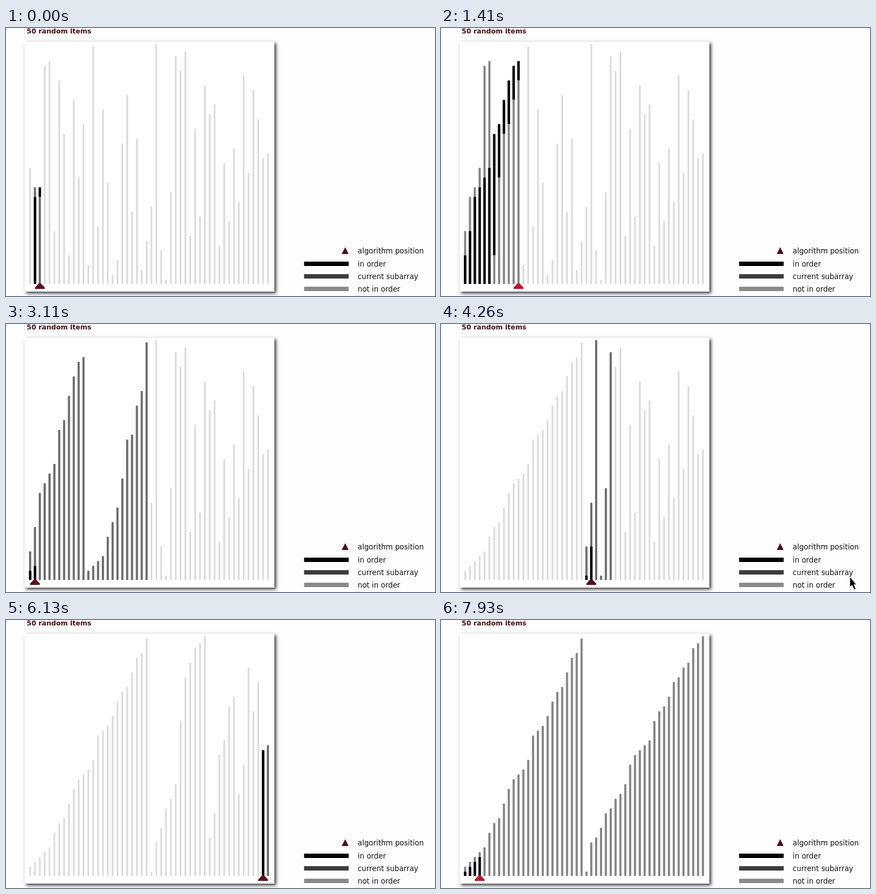
Recreate the animation shown at these times as an HTML page with a canvas. Size 788 by 491 pixels, loop 8000 ms.

```html
<!DOCTYPE html>
<html lang="en">
<head>
<meta charset="utf-8">
<title>Merge sort</title>
<style>
  html, body { margin: 0; width: 100%; height: 100%; overflow: hidden; background: #fefefe; }
  canvas { display: block; }
</style>
</head>
<body>
<canvas id="stage" width="788" height="491"></canvas>
<script>
const ctx = document.getElementById('stage').getContext('2d');

const LOOP = 8000, TICK = 77.67, LAST_TICK = 102;
const BASE = 469, CEILING = 29.5;
const LIGHT = '#dbdbdb', DARK = '#6d6d6d', GREY = '#868686', MAROON = '#5a0f1c', RED = '#bd1530';

const items = [
  24, 20, 18, 45, 46, 11, 42, 31, 6, 38, 22, 33, 4, 49, 12, 36, 21, 2, 5, 29, 39, 15, 30, 3, 9,
  16, 50, 7, 1, 19, 47, 44, 48, 10, 32, 14, 41, 35, 37, 8, 25, 13, 28, 17, 43, 23, 40, 34, 26, 27
];

// Record every merge with the array as it was before and the merged run.
const merges = [];
let total = 0;
function sort(a, lo, hi) {
  if (hi - lo < 2) return;
  const mid = lo + ((hi - lo) >> 1);
  sort(a, lo, mid);
  sort(a, mid, hi);
  const before = a.slice();
  const run = a.slice(lo, hi).sort((p, q) => p - q);
  a.splice(lo, hi - lo, ...run);
  merges.push({ lo, hi, before, run, start: total });
  total += hi - lo;
}
sort(items.slice(), 0, items.length);

const barX = i => 44.3 + 8.915 * i;
const barTop = v => Math.max(CEILING, 469.8 - 8.9 * v);

function bar(i, top, bottom, color, width) {
  ctx.fillStyle = color;
  ctx.beginPath();
  ctx.roundRect(barX(i) - width / 2, top, width, bottom - top, 1);
  ctx.fill();
}

function poly(points, fill, stroke, width = 1) {
  ctx.beginPath();
  points.forEach(([x, y]) => ctx.lineTo(x, y));
  ctx.closePath();
  ctx.fillStyle = fill;
  ctx.fill();
  if (!stroke) return;
  ctx.strokeStyle = stroke;
  ctx.lineWidth = width;
  ctx.stroke();
}

function text(str, x, y, font, color) {
  ctx.font = font;
  ctx.fillStyle = color;
  ctx.fillText(str, x, y);
}

function panel() {
  ctx.save();
  ctx.shadowColor = 'rgba(0,0,0,.8)';
  ctx.shadowBlur = 6;
  ctx.shadowOffsetX = ctx.shadowOffsetY = 2.5;
  ctx.fillStyle = '#fff';
  ctx.fillRect(34, 25, 459, 458);
  ctx.restore();
}

function legend() {
  const font = '13.35px "DejaVu Sans", sans-serif';
  poly([[623, 402.5], [628.5, 413.5], [617.5, 413.5]], MAROON, '#2a0a10');
  text('algorithm position', 646, 413, font, '#111');
  [['in order', '#000'], ['current subarray', '#3c3c3c'], ['not in order', '#8a8a8a']].forEach(([label, color], i) => {
    const y = 432 + 23 * i;
    ctx.fillStyle = color;
    ctx.fillRect(547.5, y - 4, 82, 8);
    text(label, 646, y + 4.5, font, '#111');
  });
}

function bars(count) {
  const m = merges.findLast(e => e.start < count);
  const done = count - m.start;
  const idle = done < 3 ? DARK : GREY;
  m.before.forEach((old, i) => {
    const top = barTop(old);
    if (i < m.lo || i >= m.hi) return bar(i, top, BASE, LIGHT, 3.2);
    if (i >= m.lo + done) return bar(i, top, BASE, idle, 4);
    const next = barTop(m.run[i - m.lo]);
    bar(i, top, BASE, idle, 4);
    // A taller value adds black above the old bar, a shorter one covers its foot.
    if (next < top) bar(i, next, top, '#000', 4.6);
    else bar(i, next, BASE, '#000', 4.6);
  });
  return m.lo + done - 1;
}

function pointer(i, tick) {
  const phase = tick % 8;
  const color = phase === 1 ? '#160a0e' : phase === 0 || phase === 7 ? MAROON : RED;
  const x = barX(i);
  poly([[x - 2, 468], [x + 2, 468], [x + 9, 475.5], [x + 9, 478], [x - 9, 478], [x - 9, 475.5]], color);
}

function cursor(t) {
  if (t < 4180 || t >= 4430) return;
  const y = t < 4350 ? 463 : 470;
  const shape = [[0, 0], [0, 19], [4, 15.5], [8, 24], [11, 22.5], [7.5, 14.5], [12, 14.5]];
  poly(shape.map(([dx, dy]) => [751 + dx, y + dy]), '#000', '#fff', 0.8);
}

function draw(now) {
  const t = now % LOOP;
  const tick = Math.min(LAST_TICK, Math.floor((t + 12.5) / TICK));
  const count = Math.round(2 + tick * 7 / 3);
  ctx.fillStyle = '#fefefe';
  ctx.fillRect(0, 0, 788, 491);
  text('50 random items', 38, 10, 'bold 12.45px "DejaVu Sans", sans-serif', '#46101a');
  panel();
  legend();
  pointer(bars(count), tick);
  cursor(t);
}

let origin;
function loop(now) {
  origin ??= now;
  draw(Math.max(0, now - origin));
  requestAnimationFrame(loop);
}
draw(0);
requestAnimationFrame(loop);
</script>
</body>
</html>
```
